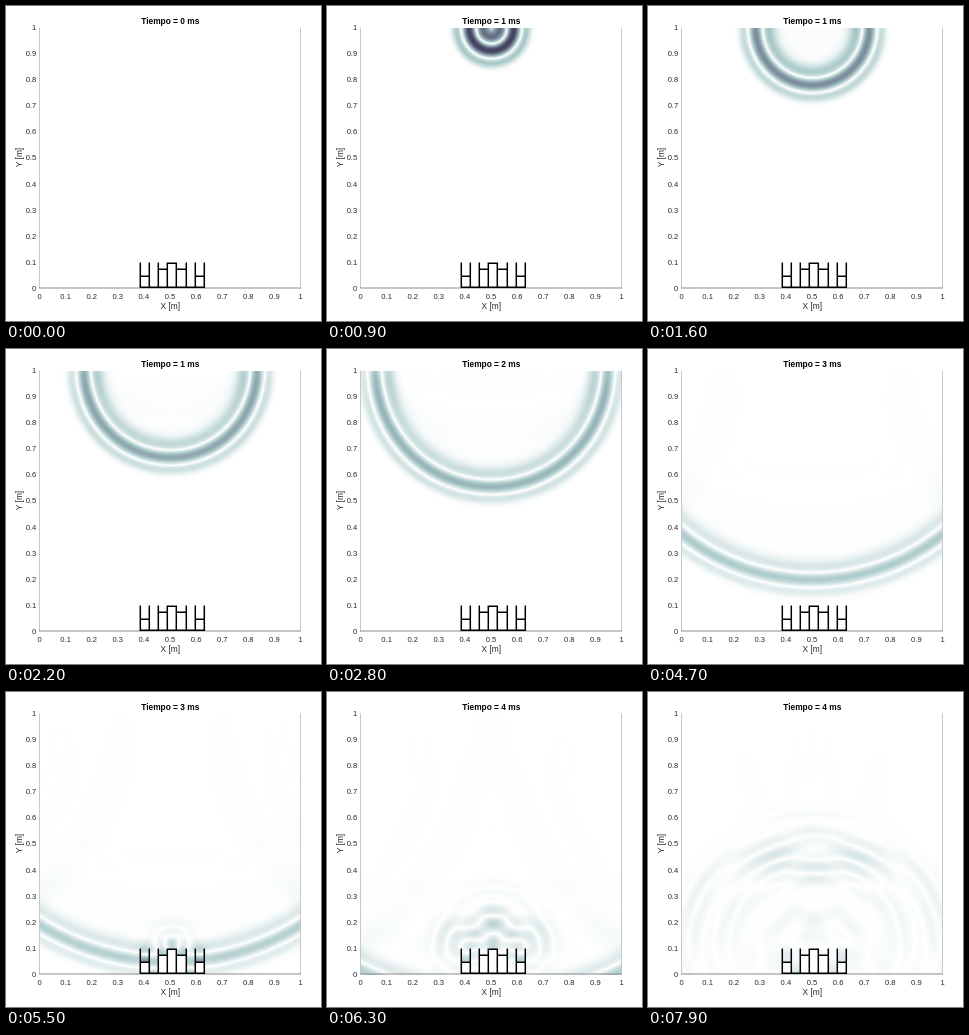
These frames come from a looping animation (315 px wide and 315 px high, 8 s). An HTML page with a canvas:

```html
<!DOCTYPE html>
<html lang="es">
<head>
<meta charset="utf-8">
<title>Difusor</title>
<style>
html, body { margin: 0; width: 100%; height: 100%; overflow: hidden; background: #fff; }
canvas { position: absolute; left: 34px; top: 22px; }
svg { position: absolute; left: 0; top: 0; }
text { font: 7.6px "Liberation Sans", Arial, sans-serif; fill: #262626; text-anchor: middle; }
.label { font-size: 8.36px; }
#title { font-size: 8.36px; font-weight: bold; fill: #000; }
.end { text-anchor: end; }
</style>
</head>
<body>
<canvas id="field" width="261" height="261"></canvas>
<svg id="plot" width="315" height="315" viewBox="0 0 315 315">
  <path d="M33.5 21.5V282M294.5 21.5V282" stroke="#c8c8c8" fill="none"/>
  <path d="M33 282H295" stroke="#8c8c8c" fill="none"/>
  <text id="title" x="164.3" y="17.8"></text>
  <text class="label" x="164.3" y="303">X [m]</text>
  <text class="label" transform="translate(16.3 151.5) rotate(-90)">Y [m]</text>
</svg>
<script>
const FRAMES = 80, FRAME_MS = 100;
const LEFT = 34, TOP = 22, SIZE = 261, PAD = 50, W = SIZE + 2 * PAD;
const STEPS = 7, COURANT = 0.7;   // cells travelled per step
const DELAY = 21.4, WIDTH = 10.8, GAIN = 9.7;

const plot = document.getElementById('plot');
const title = document.getElementById('title');
const ctx = document.getElementById('field').getContext('2d');

function add(tag, attrs, text = '') {
  const el = document.createElementNS('http://www.w3.org/2000/svg', tag);
  for (const k in attrs) el.setAttribute(k, attrs[k]);
  el.textContent = text;
  plot.append(el);
}

for (let k = 0; k <= 10; k++) {
  const value = String(k / 10);
  add('text', { x: 33.5 + 26.1 * k, y: 292.6 }, value);
  add('text', { x: 30.2, y: 284.7 - 26.05 * k, class: 'end' }, value);
}

// Rigid walls of the diffuser: open = 0 inside a wall
const open = new Float32Array(W * W).fill(1);
let outline = '';
function wall(x0, y0, x1, y1) {
  for (let y = y0; y <= y1; y++)
    for (let x = x0; x <= x1; x++) open[(y - TOP + PAD) * W + x - LEFT + PAD] = 0;
  outline += `M${x0 + .3} ${y0 + .3}L${x1 + .3} ${y1 + .3}`;
}
const fins = [134, 143, 152, 161, 170, 180, 189, 198];
fins.forEach(x => wall(x, 257, x, 281));
[[0, 270], [2, 263], [3, 257], [4, 263], [6, 270]].forEach(([i, y]) => wall(fins[i], y, fins[i + 1], y));
wall(134, 281, 198, 281);
add('path', { d: outline, stroke: '#000', 'stroke-width': 1.5, 'stroke-linecap': 'square', fill: 'none' });

// Absorbing margin around the visible square
const damp = new Float32Array(W * W);
const depth = v => Math.max(0, PAD - v, v - (W - 1 - PAD)) / PAD;
for (let y = 0; y < W; y++)
  for (let x = 0; x < W; x++) damp[y * W + x] = 0.1 * Math.max(depth(x), depth(y)) ** 2;

// Half derivative of a Ricker pulse, so that the circular wave itself is a Ricker pulse
const pulse = [], weights = [1];
function source(n) {
  const s = n * COURANT, u = ((s - DELAY) / WIDTH) ** 2;
  pulse[n] = (1 - 2 * u) * Math.exp(-u) * Math.min(1, s / 8);
  if (n) weights[n] = weights[n - 1] * (n - 1.5) / n;
  let sum = 0;
  for (let k = 0; k <= n; k++) sum += weights[k] * pulse[n - k];
  return GAIN * sum;
}

let now = new Float32Array(W * W), old = new Float32Array(W * W), count = 0;
function step() {
  const p = now, q = old, c2 = COURANT * COURANT;
  for (let y = 1; y < W - 1; y++) {
    for (let i = y * W + 1, end = i + W - 2; i < end; i++) {
      if (!open[i]) continue;
      const c = p[i], d = damp[i];
      const lap = open[i - 1] * (p[i - 1] - c) + open[i + 1] * (p[i + 1] - c)
                + open[i - W] * (p[i - W] - c) + open[i + W] * (p[i + W] - c);
      q[i] = (2 * c - (1 - d) * q[i] + c2 * lap) / (1 + d);
    }
  }
  q[PAD * W + PAD + 130] += source(count++);
  now = q;
  old = p;
}

// Bone palette, white for silence
const unit = v => Math.min(1, Math.max(0, v));
const palette = Array.from({ length: 256 }, (_, k) => {
  const v = 1 - k / 255;
  return [v * 4 - 3, (v - .375) * 8 / 3, v * 8 / 3].map(h => 255 * (7 * v + unit(h)) / 8);
});

function snapshot() {
  const img = new ImageData(SIZE, SIZE);
  for (let y = 0, o = 0; y < SIZE; y++)
    for (let x = 0; x < SIZE; x++, o += 4) {
      const level = unit(Math.abs(now[(y + PAD) * W + x + PAD]));
      img.data.set(palette[Math.round(level * 255)], o);
      img.data[o + 3] = 255;
    }
  return img;
}

const frames = [snapshot()];
let start, shown = -1;
function draw(time) {
  start ??= time;
  const n = Math.floor((time - start) / FRAME_MS) % FRAMES;
  while (frames.length <= n) {
    for (let k = 0; k < STEPS; k++) step();
    frames.push(snapshot());
  }
  if (n !== shown) {
    ctx.putImageData(frames[n], 0, 0);
    title.textContent = `Tiempo = ${Math.round(n * .0547 + .1)} ms`;
    shown = n;
  }
  requestAnimationFrame(draw);
}
requestAnimationFrame(draw);
</script>
</body>
</html>
```
